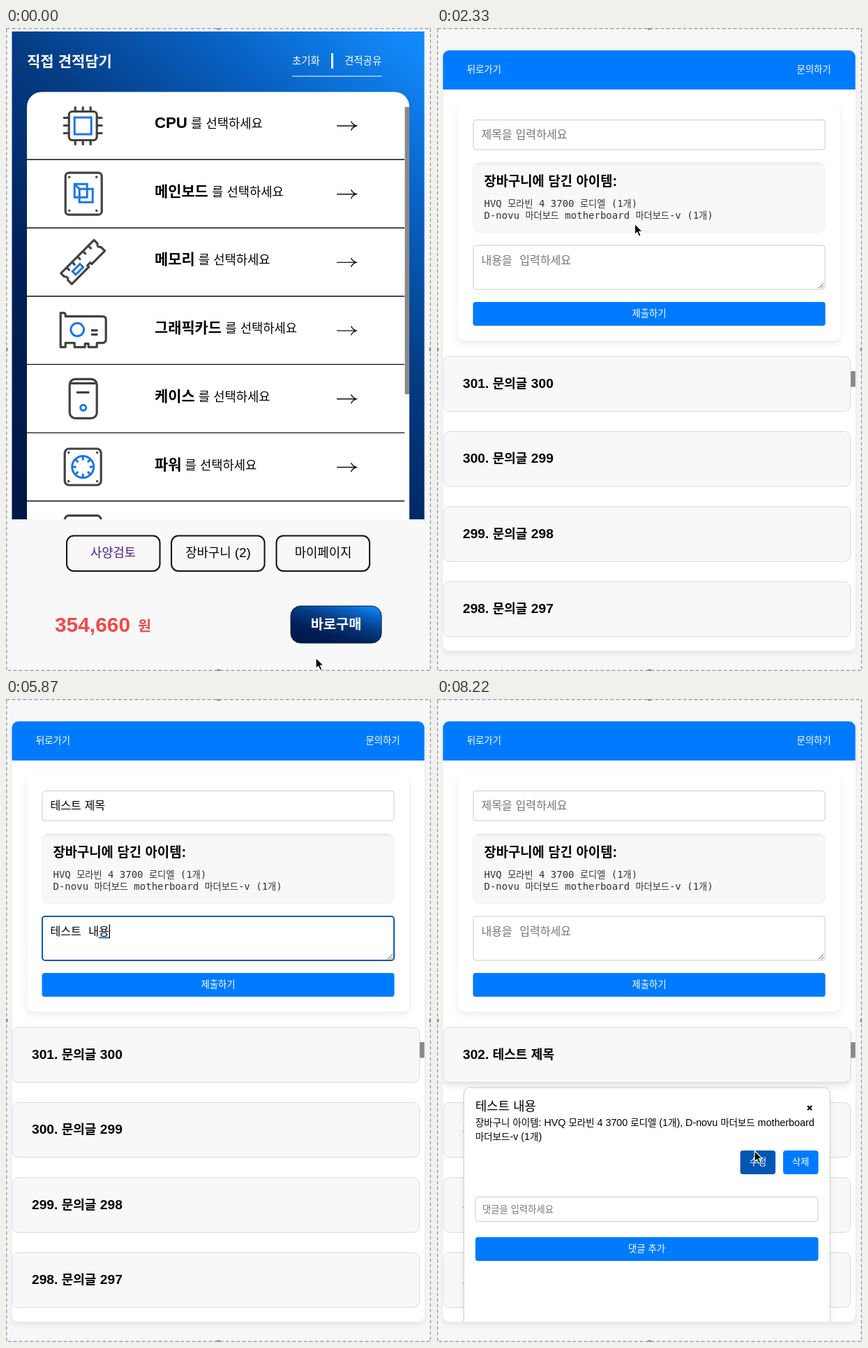
Write an HTML page that moves like this. It is 609 by 920 pixels and loops after 8.31 s.

```html
<!DOCTYPE html>
<html lang="ko">
<head>
<meta charset="utf-8">
<title>견적 문의</title>
<style>
html, body { margin: 0; width: 100%; height: 100%; overflow: hidden; background: #f7f7f7; }
svg { display: block; width: 609px; height: 920px; font-family: "Liberation Sans", "Noto Sans CJK KR", "Noto Sans CJK JP", sans-serif; }
text { white-space: pre; }
.ko { font-size: .94em; }
.b { font-weight: bold; }
.mono { font-family: "DejaVu Sans Mono", "Noto Sans CJK KR", "Noto Sans CJK JP", monospace; }
.mid { text-anchor: middle; }
.w { fill: #fff; }
.hint { fill: #757575; }
.ink { fill: none; stroke: #424244; stroke-width: 3.2; stroke-linecap: round; stroke-linejoin: round; }
.blue { fill: none; stroke: #1a76e6; stroke-width: 3; }
.dot { fill: #424244; }
.field { fill: #fff; stroke: #ccc; }
.field.on { stroke: #0b5cb8; stroke-width: 2; }
.btn { fill: #007bff; }
.btn.on { fill: #0056b3; }
.card { filter: drop-shadow(0 4px 4px rgba(0, 0, 0, .08)); }
.item { fill: #f8f8f8; stroke: #dadada; }
.item.on { filter: drop-shadow(0 4px 4px rgba(0, 0, 0, .11)); }
.thumb { fill: #888; }
</style>
</head>
<body>
<svg viewBox="0 0 609 920" id="stage">
  <defs>
    <linearGradient id="navy" x1=".88" y1="-.03" x2=".15" y2="1.03">
      <stop offset="0" stop-color="#1189fb"/><stop offset=".2" stop-color="#0862c4"/>
      <stop offset=".42" stop-color="#053c84"/><stop offset=".7" stop-color="#002058"/>
      <stop offset="1" stop-color="#001846"/>
    </linearGradient>
    <linearGradient id="inset" x2="0" y2="1">
      <stop offset="0" stop-color="#ebebeb"/><stop offset=".06" stop-color="#f8f8f8"/>
    </linearGradient>
    <clipPath id="panelClip"><rect x="8.5" y="32" width="591" height="859" rx="9"/></clipPath>
    <clipPath id="rowClip"><rect x="30" y="91" width="548" height="612"/></clipPath>
  </defs>
  <rect width="609" height="920" fill="#f7f7f7"/>

  <g id="quote"></g>

  <g id="board">
    <rect class="card" x="8.5" y="32" width="591" height="859" rx="9" fill="#fff"/>
    <g clip-path="url(#panelClip)">
      <rect x="8" y="32" width="592" height="56" fill="#007bff"/>
      <g id="boardText"></g>
      <g id="listPlain"></g>
      <g id="listForm"></g>
      <g id="listNew"></g>
      <g id="form"></g>
      <g id="modal"></g>
    </g>
  </g>

  <rect x=".5" y=".5" width="608" height="919" fill="none" stroke="#a3a3a3" stroke-width="2" stroke-dasharray="5 3"/>
  <g fill="#999"><circle cx="304.5" r="3"/><circle cx="304.5" cy="920" r="3"/><circle cy="460" r="3"/><circle cx="609" cy="460" r="3"/></g>

  <g id="pointer">
    <path id="arrow" d="M0 0V15.5L3.6 12.2 6 18 8.8 16.8 6.4 11.2H11.2Z" fill="#000" stroke="#fff" stroke-width="1.2"/>
    <path id="hand" d="M-1.6 8V1.2C-1.6-.9 1.4-.9 1.6 1.2V5.6Q4-.1 5 5.9 7.6 4 8.3 6.9 11.4 5.4 11.7 8.6V11.5Q11.2 14.5 9.8 16.8H1Q-1.2 13.4-4.4 10.4C-5.4 8.2-3.4 7-1.6 9ZM2.3 10V14.5M5 10V14.5M7.7 10V14.5" fill="#fff" stroke="#000" stroke-width="1.1" stroke-linejoin="round"/>
    <path id="beam" d="M-3-8.5Q0-8.5 0-6.5 0-8.5 3-8.5M0-6.5V6.5M-3 8.5Q0 8.5 0 6.5 0 8.5 3 8.5" fill="none" stroke="#222" stroke-width="1.3"/>
  </g>
</svg>

<script>
const LOOP = 8310, FPS = 15;
const $ = id => document.getElementById(id);

// Hangul runs sit slightly smaller than the Latin text beside them.
const rich = s => s.replace(/[ㄱ-힣]+/g, '<tspan class="ko">$&</tspan>');
const text = (x, y, size, s, cls = '', id = '') =>
  `<text x="${x}" y="${y}" font-size="${size}" class="${cls}" id="${id}">${rich(s)}</text>`;
const rect = (x, y, w, h, r, cls = '', extra = '') =>
  `<rect x="${x}" y="${y}" width="${w}" height="${h}" rx="${r}" class="${cls}" ${extra}/>`;
const dots = (...pts) => pts.map(([x, y]) => `<circle cx="${x}" cy="${y}" r="1.7" class="dot"/>`).join('');
const ink = d => `<path class="ink" d="${d}"/>`;
const blue = d => `<path class="blue" d="${d}"/>`;
const ring = (x, y, r) => `<circle class="blue" cx="${x}" cy="${y}" r="${r}"/>`;

// Icons are drawn around the centre of their row's icon slot.
const corners = (x, y) => dots([-x, -y], [x, -y], [-x, y], [x, y]);
const spokes = Array.from({ length: 8 }, (_, i) =>
  `<path class="blue" d="M0-15V-9.5" transform="rotate(${i * 45})"/>`).join('');
const icons = [
  rect(-20, -20, 40, 41, 5, 'ink') + rect(-12, -11.5, 24, 24, 0, 'blue') +
    ink('M-11-20V-26M0-20V-26M11-20V-26M-11 21V27M0 21V27M11 21V27M-20-11H-27M-20 0H-27M-20 11H-27M20-11H27M20 0H27M20 11H27'),
  rect(-25, -30, 52, 60, 5, 'ink') + corners(19.5, 24) +
    blue('M-12-14H6V5H-12ZM-5-7H14V12H-5ZM-12-14L-5-7'),
  `<g transform="rotate(-45)">${ink('M-33.5-11H33.5V-4Q29-1 33.5 3V11H7V8H1V11H-33.5V3Q-29 0-33.5-4ZM-22-11V-6M-11-11V-6M0-11V-6M11-11V-6M22-11V-6')}${rect(-20, -1, 15, 6.5, 0, 'blue')}</g>`,
  ink('M-25-20V-22Q-25-25-28-25H-32V24H-25V18H-12V24H3V19H8V24H20V18H28Q33 18 33 13V-15Q33-20 28-20H-25M13 0H20M13 6H20') + ring(-8, -1, 9.3),
  rect(-19, -28, 39, 56, 8, 'ink') + ink('M-17-22H18M-8-9H8') + ring(0.5, 13, 4),
  rect(-26, -26, 52, 52, 6, 'ink') + corners(20.5, 20.5) + ring(0, 0, 15.5) + spokes,
  rect(-26, -28, 52, 52, 6, 'ink')
];
const parts = ['CPU', '메인보드', '메모리', '그래픽카드', '케이스', '파워', ''];

const row = (name, i) => {
  const y = 97.7 * i;
  const label = name && `<text x="213" y="${143 + y}" font-size="18.8"><tspan class="b" font-size="22.2">${rich(name)}</tspan>${rich(' 를 선택하세요')}</text>`;
  return `<g transform="translate(110.2 ${139.5 + y})">${icons[i]}</g>${label}
    <path d="M474 ${140 + y}h26m-5.5-6.5q2 4.8 7.5 6.5q-5.5 1.7-7.5 6.5M30 ${188.3 + y}h541" fill="none" stroke="#111" stroke-width="1.4"/>`;
};

const outline = x => rect(x, 726.5, 133.5, 50.5, 10, '', 'fill="#f8f8f8" stroke="#111" stroke-width="2"');
$('quote').innerHTML =
  rect(8.5, 5, 591, 700, 0, '', 'fill="url(#navy)"') +
  text(30, 55, 22.3, '직접 견적담기', 'w b') +
  text(410, 52, 15.4, '초기화', 'w') + text(485, 52, 15.4, '견적공유', 'w') +
  rect(466, 36, 3, 22, 0, 'w') + rect(410, 68.5, 128.5, 1, 0, 'w') +
  '<path class="w" d="M30 703V112.5A21 21 0 0 1 51 91.5H557A21 21 0 0 1 578 112.5V703Z"/>' +
  `<g clip-path="url(#rowClip)">${parts.map(row).join('')}</g>` +
  rect(571.5, 113, 6.5, 411, 0, 'thumb') +
  rect(8.5, 703, 591, 217, 0, '', 'fill="#f8f8f8"') +
  [87, 237, 387.5].map(outline).join('') +
  text(153.5, 757, 18.8, '사양검토', 'mid', 'review') +
  text(304, 757, 18.9, '장바구니 (2)', 'mid') + text(454.5, 757, 18.9, '마이페이지', 'mid') +
  `<g fill="#f14a4a">${text(70, 864, 29.9, '354,660', 'b')}${text(189, 863, 22, '원', 'b')}</g>` +
  rect(408, 827, 130, 53, 14, '', 'fill="url(#navy)" stroke="#02163c"') +
  text(473, 860, 21, '바로구매', 'w b mid');
$('review').setAttribute('fill', '#4f1c86');

$('boardText').innerHTML = text(43, 64, 14.2, '뒤로가기', 'w') + text(515.5, 64, 14.2, '문의하기', 'w');

const list = (top, fresh) => Array.from({ length: 8 }, (_, i) => {
  const n = 301 + fresh - i, y = top + 107.4 * i;
  const label = n > 301 ? '302. 테스트 제목' : `${n}. 문의글 ${n - 1}`;
  return rect(9, y, 583.5, 78.5, 9, 'item', n > 301 ? 'id="newest"' : '') + text(37, y + 45, 19.2, label, 'b');
}).join('') + rect(593, top + 21, 7, 22.5, 0, 'thumb');
$('listPlain').innerHTML = list(88.5, 0);
$('listForm').innerHTML = list(470, 0);
$('listNew').innerHTML = list(470, 1);

const cpu = 'HVQ 모라빈 4 3700 로디엘 (1개)', mainboard = 'D-novu 마더보드 motherboard', tail = '마더보드-v (1개)';
$('form').innerHTML =
  rect(30, 109, 548, 338.5, 9, 'w card') +
  rect(52, 131.5, 504, 42.5, 4, 'field', 'id="titleBox"') + text(63.5, 158, 17.1, '', '', 'titleText') +
  rect(52, 192.5, 504, 100, 9, '', 'fill="url(#inset)" stroke="#f0f0f0"') +
  text(67.5, 226, 20, '장바구니에 담긴 아이템:', 'b') +
  `<g fill="#333">${text(67.5, 255.5, 14, cpu, 'mono')}${text(67.5, 272.5, 14, mainboard + ' ' + tail, 'mono')}</g>` +
  rect(52, 311, 504, 63, 4, 'field', 'id="bodyBox"') + text(63.5, 338, 17.1, '', 'mono', 'bodyText') +
  '<path d="M546.5 372.5l7.5-7.5m-3.5 7.5l3.5-3.5" stroke="#666"/>' +
  rect(51.5, 392, 505, 34, 4, 'btn', 'id="send"') + text(304, 413, 14.2, '제출하기', 'w mid') +
  rect(0, 0, 14.8, 2, 0, '', 'id="mark" fill="#0a6fdc"') + rect(0, 0, 1.3, 20, 0, '', 'id="caret"');

$('modal').innerHTML =
  rect(38.5, 556, 524.5, 380, 8, 'w card', 'stroke="#ccc"') +
  text(55, 589, 18.9, '테스트 내용') +
  text(55, 611, 14.3, `장바구니 아이템: ${cpu}, ${mainboard}`) + text(55, 631, 14.3, tail) +
  '<path d="M531 582l6 6m0-6l-6 6" stroke="#111" stroke-width="2.4"/>' +
  rect(434.5, 646, 50.5, 34, 4, 'btn', 'id="edit"') + text(460, 667, 14.2, '수정', 'w mid') +
  rect(496, 646, 50.5, 34, 4, 'btn') + text(521, 667, 14.2, '삭제', 'w mid') +
  rect(55, 712.5, 491, 35, 4, 'field') + text(65, 735, 14.2, '댓글을 입력하세요', 'hint') +
  rect(55, 770, 491.5, 34, 4, 'btn') + text(300.5, 791, 14.2, '댓글 추가', 'w mid');

// Times in ms
const T = { board: 730, form: 1530, title: 3066, typeTitle: 4000, body: 4730, typeBody: 5330, sent: 6466, modal: 7466 };
const start = ['ㅌ', '테ㅅ', '테스', '테슽', '테스트', '테스트 '];
const titleKeys = [...start, '테스트 제', '테스트 제모', '테스트 제목'];
const bodyKeys = [...start, '테스트 내', '테스트 내요', '테스트 내용'];

// time, x, y, pointer shape from that time on
const path = [
  [0, 444, 901, 'arrow'], [67, 444, 901, 'arrow'], [400, 255, 838, 'arrow'], [570, 160, 765, 'hand'],
  [730, 142, 755, 'hand'], [867, 127, 759, 'hand'], [1000, 127, 759, 'arrow'], [1133, 508, 58, 'arrow'],
  [1260, 508, 58, 'arrow'], [1400, 530, 59, 'hand'], [1867, 545, 50, 'hand'], [2000, 545, 50, 'hand'],
  [2130, 480, 106, 'arrow'], [2333, 284, 280, 'arrow'], [2500, 195, 297, 'arrow'], [2680, 98, 270, 'arrow'],
  [2867, 130, 209, 'arrow'], [3000, 205, 165, 'beam'], [3100, 238, 152, 'beam'], [3530, 238, 152, ''],
  [6066, 238, 152, 'beam'], [6120, 236, 185, 'arrow'], [6330, 210, 402, 'hand'], [6530, 200, 405, 'hand'],
  [6800, 200, 405, 'hand'], [6930, 180, 430, 'arrow'], [7200, 133, 519, 'arrow'], [7400, 112, 522, 'arrow'],
  [7667, 70, 586, 'arrow'], [8200, 455, 646.5, 'arrow'], [LOOP, 455, 646.5, 'arrow']
];

const show = (id, on) => { $(id).style.display = on ? '' : 'none'; };
const lit = (id, on) => $(id).classList.toggle('on', on);

function typed(keys, from, t) {
  if (t < from || t >= T.sent) return '';
  return keys[Math.min(keys.length - 1, Math.floor((t - from) * FPS / 1000 + .1))];
}

function fill(id, value, hint) {
  const el = $(id), s = value || hint;
  if (el.dataset.s !== s) { el.innerHTML = rich(s); el.dataset.s = s; }
  el.classList.toggle('hint', !value);
}

function movePointer(t) {
  const i = path.findLastIndex(p => p[0] <= t);
  const [t0, x0, y0, kind] = path[i], [t1, x1, y1] = path[Math.min(i + 1, path.length - 1)];
  const k = t1 > t0 ? (t - t0) / (t1 - t0) : 0;
  $('pointer').setAttribute('transform', `translate(${x0 + (x1 - x0) * k} ${y0 + (y1 - y0) * k})`);
  ['arrow', 'hand', 'beam'].forEach(name => show(name, name === kind));
}

function render(t) {
  const board = t >= T.board, form = t >= T.form, sent = t >= T.sent;
  show('quote', !board);
  show('board', board);
  show('listPlain', !form);
  show('listForm', form && !sent);
  show('listNew', sent);
  show('form', form);
  show('modal', t >= T.modal);

  const title = typed(titleKeys, T.typeTitle, t), body = typed(bodyKeys, T.typeBody, t);
  fill('titleText', title, '제목을 입력하세요');
  fill('bodyText', body, '내용을 입력하세요');

  const inTitle = t >= T.title && t < T.body, inBody = t >= T.body && !sent;
  lit('titleBox', inTitle);
  lit('bodyBox', inBody);
  lit('send', t >= 6330 && t < 6930);
  lit('newest', t >= 7000);
  lit('edit', t >= 8130);

  const value = inTitle ? title : body, el = $(inTitle ? 'titleText' : 'bodyText');
  const x = 63.5 + (value && form ? el.getComputedTextLength() : 0), y = inTitle ? 143 : 322.5;
  $('caret').setAttribute('x', x);
  $('caret').setAttribute('y', y);
  $('mark').setAttribute('x', x - 14.8);
  $('mark').setAttribute('y', y + 18);
  show('caret', inTitle || inBody);
  show('mark', (inTitle || inBody) && /\S$/.test(value));

  movePointer(t);
}

// The picture advances in whole ticks, with a little slack for rounding.
const origin = performance.now();
function frame() {
  const t = (performance.now() - origin) % LOOP;
  render(Math.floor(t * FPS / 1000 + .1) * 1000 / FPS + 1);
  requestAnimationFrame(frame);
}
frame();
</script>
</body>
</html>
```
